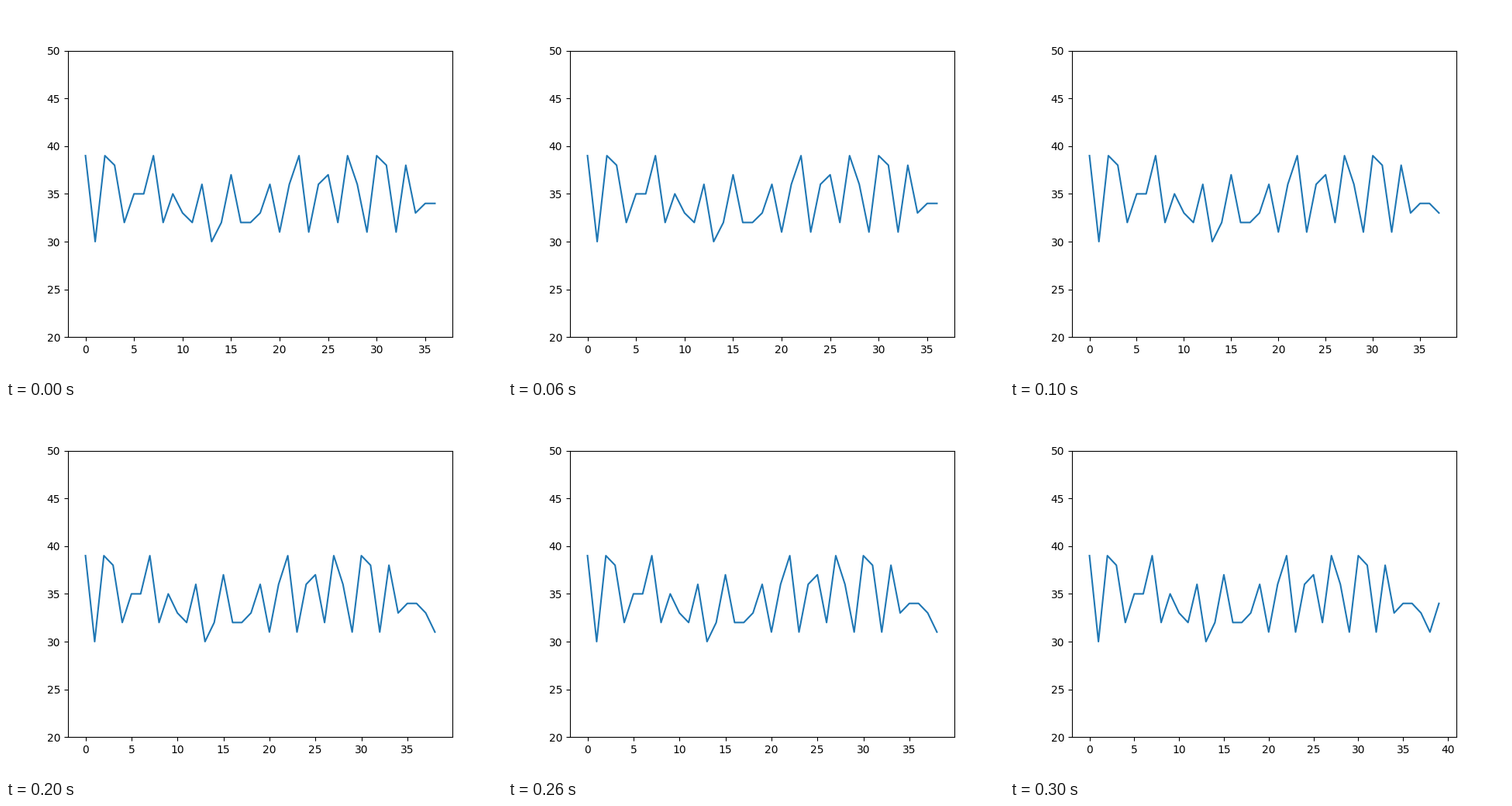
Write a matplotlib script that moves like this. It is 640x480 px and loops after 0.4 s.

```python
import matplotlib.pyplot as plt
from matplotlib.animation import FuncAnimation

READINGS = [
    39, 30, 39, 38, 32, 35, 35, 39, 32, 35,
    33, 32, 36, 30, 32, 37, 32, 32, 33, 36,
    31, 36, 39, 31, 36, 37, 32, 39, 36, 31,
    39, 38, 31, 38, 33, 34, 34, 33, 31, 34,
]
FRAMES = 4
INTERVAL = 100
MARGIN = 0.05

fig, ax = plt.subplots(figsize=(6.4, 4.8), dpi=100)
ax.set_ylim(20, 50)
line, = ax.plot([], [], color="tab:blue", lw=1.5)


def update(frame):
    """Show one more reading per frame and refit the x axis."""
    count = len(READINGS) - FRAMES + 1 + frame
    last = count - 1
    line.set_data(range(count), READINGS[:count])
    ax.set_xlim(-MARGIN * last, (1 + MARGIN) * last)
    return line,


def init():
    return update(0)


anim = FuncAnimation(fig, update, frames=FRAMES, init_func=init,
                     interval=INTERVAL, repeat=True, repeat_delay=0, blit=False)
plt.show()
```
